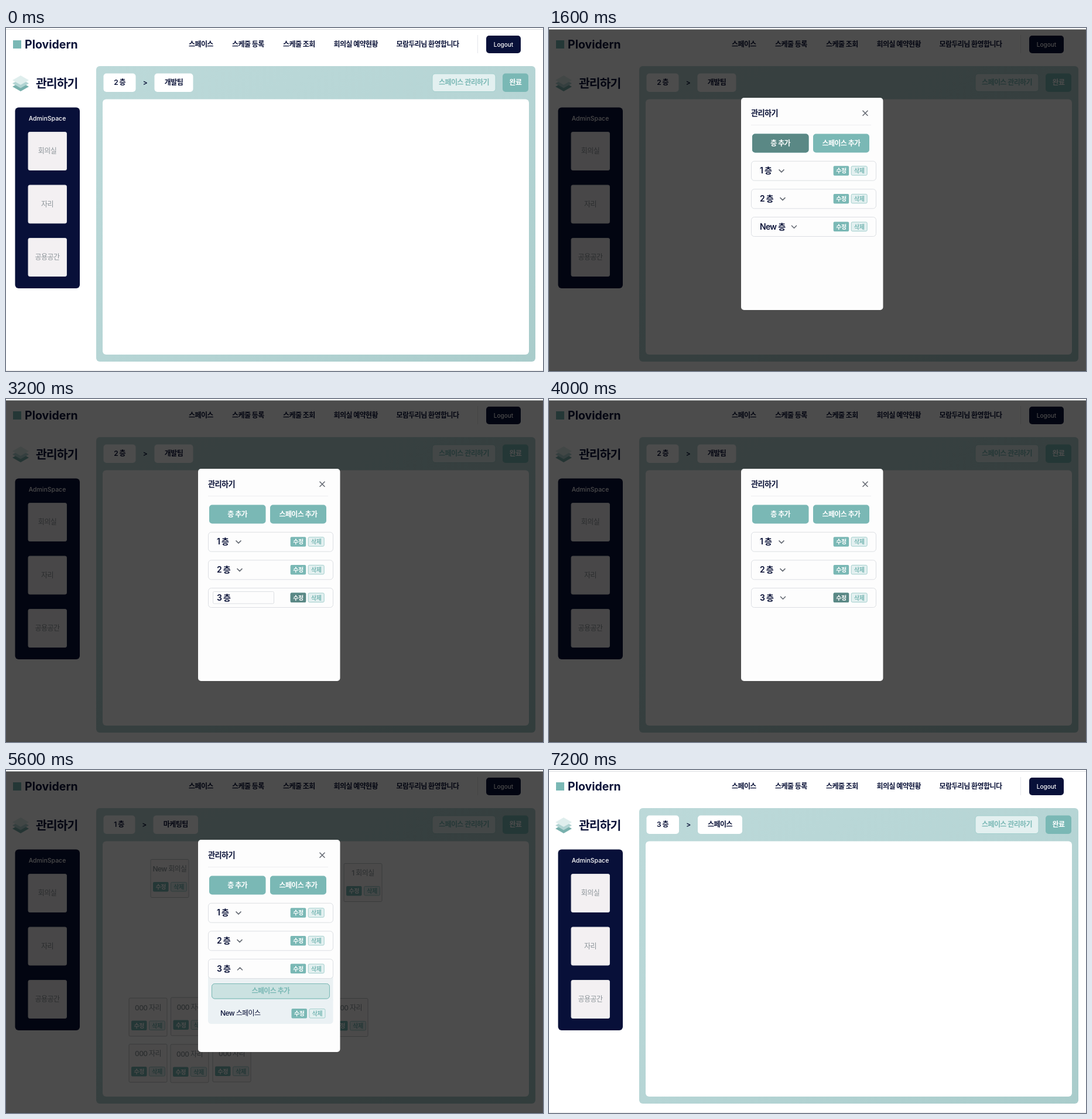
These frames come from a looping animation (917 px wide and 585 px high, 8 s). An HTML page:

```html
<!DOCTYPE html>
<html lang="ko">
<head>
<meta charset="utf-8">
<title>관리하기</title>
<style>
  html, body { margin: 0; width: 100%; height: 100%; overflow: hidden; background: #fff; }
  svg { display: block; width: 917px; height: 585px; }
  text {
    font: 600 12px Inter, "Noto Sans CJK KR", "Noto Sans KR", sans-serif;
    letter-spacing: -.05em; fill: #0a1238;
  }
  .mid { text-anchor: middle; }
  .en { letter-spacing: 0; }
  .white { fill: #fff; }
  .teal { fill: #7ab8b5; }
  .dark { fill: #5a8885; }
  .pale { fill: #e3f0f0; stroke: #a3cfcd; }
  .navy { fill: #081039; }
  .soft { fill: #8c9499; font-weight: 500; }
  .floor { font-size: 14px; }
  .chip { font-size: 10px; }
  .tile { fill: #f3f0f2; stroke: #dddde1; }
  .row { fill: #fdfdfd; stroke: #dcdfe3; }
  .mark { fill: none; stroke: #666b74; stroke-width: 1.6; stroke-linecap: round; stroke-linejoin: round; }

  /* --s: first step shown, --n: number of steps; a step lasts 0.8 s */
  .on { animation: 8s step-end calc(var(--s) * .8s - 8s) infinite; }
  .n1 { animation-name: n1; }
  .n2 { animation-name: n2; }
  .n3 { animation-name: n3; }
  .n4 { animation-name: n4; }
  .n7 { animation-name: n7; }
  .n8 { animation-name: n8; }
  @keyframes n1 { 0% { visibility: visible } 10%, 100% { visibility: hidden } }
  @keyframes n2 { 0% { visibility: visible } 20%, 100% { visibility: hidden } }
  @keyframes n3 { 0% { visibility: visible } 30%, 100% { visibility: hidden } }
  @keyframes n4 { 0% { visibility: visible } 40%, 100% { visibility: hidden } }
  @keyframes n7 { 0% { visibility: visible } 70%, 100% { visibility: hidden } }
  @keyframes n8 { 0% { visibility: visible } 80%, 100% { visibility: hidden } }
</style>
</head>
<body>
<svg viewBox="0 0 917 585">
  <defs>
    <linearGradient id="panel" x1="0" y1="0" x2="1" y2="1">
      <stop offset="0" stop-color="#bcd9d9"/>
      <stop offset=".5" stop-color="#b6d5d5"/>
      <stop offset="1" stop-color="#a9cccb"/>
    </linearGradient>
    <g id="chips">
      <rect class="teal" width="26.5" height="16.5" rx="2"/>
      <text class="chip mid white" x="13.2" y="12">수정</text>
      <rect class="pale" x="30.5" y=".5" width="27" height="15.5" rx="2"/>
      <text class="chip mid teal" x="44" y="12">삭제</text>
    </g>
    <g id="edit">
      <rect class="dark" width="26.5" height="16.5" rx="2"/>
      <text class="chip mid white" x="13.2" y="12">수정</text>
    </g>
    <g id="row">
      <rect class="row" x=".5" y=".5" width="213" height="33" rx="5"/>
      <use href="#chips" x="140.7" y="8.5"/>
    </g>
    <path id="down" class="mark" d="M-4-1.8 0 2.2 4-1.8"/>
    <path id="up" class="mark" d="M-4 2 0-2 4 2"/>
    <g id="card">
      <rect fill="#fbfafa" stroke="#c4c8ca" x=".5" y=".5" width="65" height="65" rx="2"/>
      <use href="#chips" x="4.5" y="39"/>
    </g>
    <g id="seat">
      <use href="#card"/>
      <text class="mid soft" x="33" y="21.3">000 자리</text>
    </g>
    <path id="sheet" d="M0-8 14 0 0 8-14 0Z"/>
  </defs>

  <rect class="white" width="917" height="585"/>
  <path d="M0 2.5H917" stroke="#dcdfe1"/>
  <path d="M0 584.5H917" stroke="#e6e7e9"/>

  <!-- header -->
  <rect class="teal" x="12" y="21" width="14" height="14"/>
  <text class="en" x="32" y="35" style="font-size:19.5px;font-weight:700">Plovidern</text>
  <text x="312" y="32.3">스페이스</text>
  <text x="386" y="32.3">스케줄 등록</text>
  <text x="473" y="32.3">스케줄 조회</text>
  <text x="559.5" y="32.3">회의실 예약현황</text>
  <text x="666.5" y="32.3">모람두리님 환영합니다</text>
  <path d="M805.5 12V43" stroke="#e4e5ea"/>
  <rect class="navy" x="820" y="13" width="59" height="30" rx="5"/>
  <text class="en mid white" x="849.5" y="31.6" style="font-size:10px;font-weight:500">Logout</text>

  <!-- sidebar -->
  <use href="#sheet" x="25" y="100" fill="#78b0ad"/>
  <use href="#sheet" x="25" y="94.5" fill="#b2d4d3"/>
  <use href="#sheet" x="25" y="89" fill="#dfeeed"/>
  <text x="51" y="102" style="font-size:20.5px">관리하기</text>
  <rect class="navy" x="15.5" y="135.5" width="110.5" height="308.5" rx="6"/>
  <text class="en mid white" x="70.5" y="157.7" style="font-size:10.5px;font-weight:500">AdminSpace</text>
  <rect class="tile" x="38" y="177.5" width="65.5" height="65" rx="2.5"/>
  <rect class="tile" x="38" y="268" width="65.5" height="65" rx="2.5"/>
  <rect class="tile" x="38" y="358.5" width="65.5" height="65" rx="2.5"/>
  <text class="mid soft" x="70.5" y="214.3">회의실</text>
  <text class="mid soft" x="70.5" y="304.8">자리</text>
  <text class="mid soft" x="70.5" y="395.3">공용공간</text>

  <!-- work area -->
  <rect fill="url(#panel)" x="154" y="65" width="750" height="504" rx="6"/>
  <rect class="white" x="165" y="121.5" width="728" height="435.5" rx="6"/>
  <rect class="pale" x="728" y="78" width="108" height="30.5" rx="5"/>
  <text class="mid teal" x="782" y="97.3">스페이스 관리하기</text>
  <rect class="teal" x="848" y="77.5" width="44" height="31.5" rx="5"/>
  <text class="mid white" x="870" y="97.3">완료</text>

  <g class="on n7" style="--s:0">
    <rect class="white" x="166.5" y="77.5" width="55" height="31.5" rx="5"/>
    <rect class="white" x="253.5" y="77.5" width="66" height="31.5" rx="5"/>
    <text class="mid" x="194" y="97.3">2 층</text>
    <text class="mid" x="237.5" y="97.3">&gt;</text>
    <text class="mid" x="286.5" y="97.3">개발팀</text>
  </g>
  <g class="on n2" style="--s:7">
    <rect class="white" x="166.5" y="77.5" width="54" height="31.5" rx="5"/>
    <rect class="white" x="251.5" y="77.5" width="76.5" height="31.5" rx="5"/>
    <text class="mid" x="193" y="97.3">1 층</text>
    <text class="mid" x="236" y="97.3">&gt;</text>
    <text class="mid" x="289.7" y="97.3">마케팅팀</text>
    <use href="#card" x="246.5" y="152"/>
    <text class="mid soft" x="279.5" y="173.3">New 회의실</text>
    <use href="#card" x="576.5" y="159"/>
    <text class="mid soft" x="609.5" y="180.3">1 회의실</text>
    <use href="#seat" x="209.5" y="388.5"/>
    <use href="#seat" x="281" y="387.5"/>
    <use href="#seat" x="552.5" y="389"/>
    <use href="#seat" x="209.5" y="467"/>
    <use href="#seat" x="280.5" y="467.5"/>
    <use href="#seat" x="352.5" y="466.5"/>
  </g>
  <g class="on n1" style="--s:9">
    <rect class="white" x="166.5" y="77.5" width="55.5" height="31.5" rx="5"/>
    <rect class="white" x="254" y="77.5" width="76" height="31.5" rx="5"/>
    <text class="mid" x="194" y="97.3">3 층</text>
    <text class="mid" x="238" y="97.3">&gt;</text>
    <text class="mid" x="292" y="97.3">스페이스</text>
  </g>

  <!-- dialog -->
  <g class="on n8" style="--s:1">
    <rect y="2.5" width="917" height="583" fill-opacity=".7"/>
    <rect fill="#fdfdfd" x="328" y="119" width="242.5" height="362" rx="5"/>
    <text x="345" y="149.6" style="font-size:13.2px">관리하기</text>
    <path class="mark" d="M536 141.2l8 8m0-8-8 8"/>
    <path d="M345 165.5H550" stroke="#ededf0"/>
    <rect class="teal" x="347" y="180.5" width="96.5" height="32" rx="5"/>
    <rect class="dark on n2" style="--s:1" x="347" y="180.5" width="96.5" height="32" rx="5"/>
    <rect class="teal" x="451" y="180.5" width="96" height="32" rx="5"/>
    <text class="mid white" x="395.2" y="200.8">층 추가</text>
    <text class="mid white" x="499" y="200.8">스페이스 추가</text>

    <use href="#row" x="345" y="226.7"/>
    <text class="floor" x="360" y="248.3">1 층</text>
    <use href="#down" x="397" y="243.7"/>
    <use href="#row" x="345" y="274.4"/>
    <text class="floor" x="360" y="296">2 층</text>
    <use href="#down" x="399" y="291.4"/>
  </g>

  <g class="on n3" style="--s:6">
    <path fill="#ebf1f3" d="M345 350H558.5V393a5 5 0 0 1-5 5H350a5 5 0 0 1-5-5Z"/>
  </g>
  <g class="on n2" style="--s:7">
    <path fill="#ebf1f4" d="M345 390H558.5V428a5 5 0 0 1-5 5H350a5 5 0 0 1-5-5Z"/>
    <use href="#chips" x="487.5" y="407"/>
  </g>
  <text class="on n1" style="--s:7;font-weight:500" x="366" y="419.4">New 스페이스</text>
  <g class="on n1" style="--s:8">
    <text x="366" y="419.4" style="font-weight:500">스페이스</text>
    <use href="#edit" x="487.5" y="407"/>
  </g>

  <use class="on n7" style="--s:2" href="#row" x="345" y="322"/>
  <g class="on n2" style="--s:2">
    <text class="floor" x="360" y="343.6">New 층</text>
    <use href="#down" x="418.5" y="339"/>
  </g>
  <g class="on n1" style="--s:4">
    <rect class="row" x="353.5" y="328.5" width="104" height="20.5" rx="2"/>
    <text class="floor" x="360" y="343.6">3 층</text>
  </g>
  <use class="on n2" style="--s:4" href="#edit" x="485.7" y="330.5"/>
  <text class="floor on n4" style="--s:5" x="360" y="343.6">3 층</text>
  <use class="on n1" style="--s:5" href="#down" x="399.5" y="339"/>
  <g class="on n3" style="--s:6">
    <use href="#up" x="399.5" y="339"/>
    <rect class="pale" x="351.5" y="364.5" width="201" height="25.5" rx="5"/>
  </g>
  <rect class="on n1" style="--s:7" fill="#cbe2e1" stroke="#7ab8b5" x="351.5" y="364.5" width="201" height="25.5" rx="5"/>
  <text class="mid teal on n3" style="--s:6" x="452" y="381.2">스페이스 추가</text>

  <!-- toast edge -->
  <rect class="white on n1" style="--s:3" x="912.5" y="505" width="20" height="90" rx="3"/>
</svg>
</body>
</html>
```
